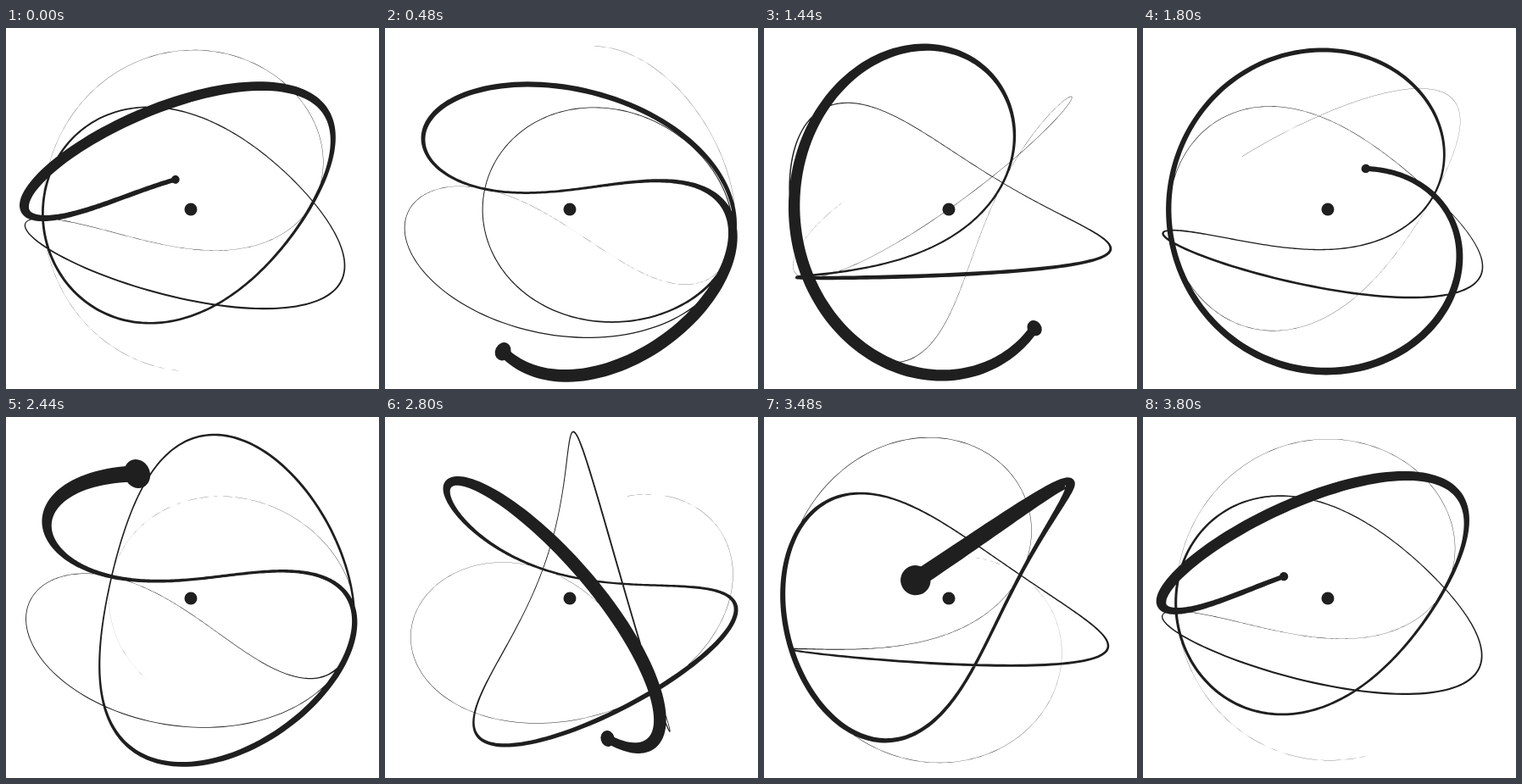
These frames come from a looping animation (440 by 426 pixels, 3840 ms). An HTML page with a canvas:

```html
<!DOCTYPE html>
<html lang="en">
<head>
<meta charset="utf-8">
<title>Orbiting trail</title>
<style>
  html, body { margin: 0; width: 100%; height: 100%; overflow: hidden; background: #fff; }
  canvas { display: block; }
</style>
</head>
<body>
<canvas id="stage" width="440" height="426"></canvas>
<script>
const ctx = document.getElementById('stage').getContext('2d');

const LOOP = 3840, STEP = 40;
const CENTER = { x: 218, y: 214 };
const RADIUS = 160.5, FOCAL = 278;
const DOT = 7.5;
const INK = '#1f1f1f';

const DEG = Math.PI / 180;
const TILT = 20 * DEG;
const TRAIL = 1250;         // length of the trail, in degrees of orbit
const TRAIL_WIDTH = 8.6;
const TRAIL_DECAY = 340;
const SEGMENT = 1.5;

// Orbit angle `a` about a slowly turning plane `b`, on a globe turned by `spin`.
// The result is relative to the centre of the stage.
function project(a, b, spin) {
  const along = Math.cos(a);
  const up = Math.sin(a) * Math.cos(b);
  const side = Math.sin(a) * Math.sin(b);
  const x = along * Math.cos(spin) - side * Math.sin(spin);
  const depth = along * Math.sin(spin) + side * Math.cos(spin);
  const y = depth * Math.sin(TILT) - up * Math.cos(TILT);
  const z = depth * Math.cos(TILT) + up * Math.sin(TILT);
  const scale = FOCAL / (FOCAL - RADIUS * z);
  return { x: RADIUS * x * scale, y: RADIUS * y * scale, scale };
}

function pointAt(turn, age) {
  return project(
    (90 + 4 * turn - age) * DEG,
    (90 - turn + age / 4) * DEG,
    (170 + turn) * DEG
  );
}

// Perspective stretches a ball away from the centre of view.
const stretch = offset => Math.hypot(1, offset / FOCAL);

const decay = age => Math.exp(-age / TRAIL_DECAY);
const trailWidth = age => TRAIL_WIDTH * (decay(age) - decay(1440));

function drawBall({ x, y, scale }) {
  const r = DOT * scale;
  ctx.beginPath();
  ctx.ellipse(x, y, r * stretch(Math.hypot(x, y)), r, Math.atan2(y, x), 0, 2 * Math.PI);
  ctx.fill();
}

function drawTrail(turn) {
  const left = [], right = [];
  for (let age = 0; age <= TRAIL; age += SEGMENT) {
    const p = pointAt(turn, age);
    const before = pointAt(turn, age - 0.2);
    const after = pointAt(turn, age + 0.2);
    const dx = after.x - before.x, dy = after.y - before.y;
    const length = Math.hypot(dx, dy) || 1;
    const nx = -dy / length, ny = dx / length;
    const half = trailWidth(age) * p.scale * stretch(p.x * nx + p.y * ny) / 2;
    left.push([p.x + nx * half, p.y + ny * half]);
    right.push([p.x - nx * half, p.y - ny * half]);
  }
  ctx.beginPath();
  for (const [x, y] of left.concat(right.reverse())) ctx.lineTo(x, y);
  ctx.closePath();
  ctx.fill('nonzero');
}

function draw(time) {
  const turn = 360 * time / LOOP;
  ctx.setTransform(1, 0, 0, 1, 0, 0);
  ctx.fillStyle = '#fff';
  ctx.fillRect(0, 0, 440, 426);
  ctx.translate(CENTER.x, CENTER.y);
  ctx.fillStyle = INK;
  drawTrail(turn);
  drawBall(pointAt(turn, 0));
  drawBall({ x: 0, y: 0, scale: 1 });
}

const start = performance.now();

function tick() {
  const elapsed = performance.now() - start;
  draw(Math.floor(elapsed / STEP + 0.1) * STEP % LOOP);
  requestAnimationFrame(tick);
}
tick();
</script>
</body>
</html>
```
